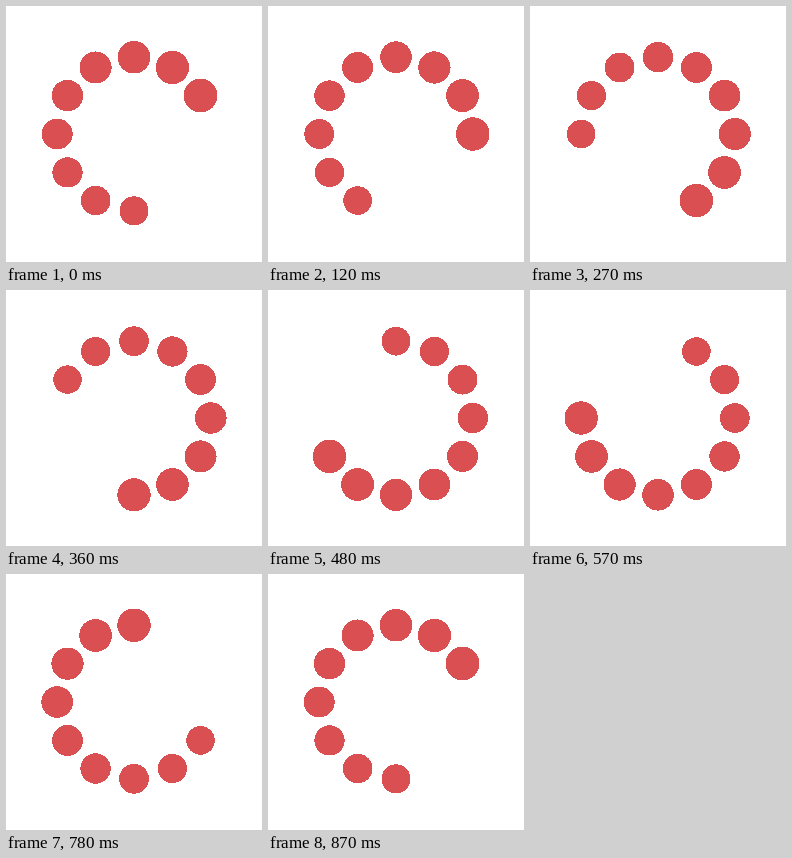
Write an HTML page with a canvas that moves like this. It is 256 px wide and 256 px high and loops after 900 ms.

```html
<!DOCTYPE html>
<html lang="en">
<head>
<meta charset="utf-8">
<title>Spinner</title>
<style>
  html, body { margin: 0; width: 100%; height: 100%; overflow: hidden; background: #fff; }
  canvas { display: block; width: 256px; height: 256px; image-rendering: pixelated; }
</style>
</head>
<body>
<canvas id="stage" width="256" height="256"></canvas>
<script>
const ctx = document.getElementById('stage').getContext('2d');
const DOTS = 12, VISIBLE = 9;
const CENTER = 128, ORBIT = 76.8;
const START_RADIUS = 16.9, END_RADIUS = 13.3;
const STEP_MS = 30, STEPS = 30;

// Hard-edged disc: fill only the pixels whose centre lies inside.
function disc(cx, cy, r) {
  for (let y = Math.floor(cy - r); y <= cy + r; y++) {
    const dy = y + 0.5 - cy;
    if (Math.abs(dy) > r) continue;
    const half = Math.sqrt(r * r - dy * dy);
    const left = Math.ceil(cx - half - 0.5);
    const right = Math.floor(cx + half - 0.5);
    ctx.fillRect(left, y, right - left + 1, 1);
  }
}

function draw(step) {
  ctx.fillStyle = '#fff';
  ctx.fillRect(0, 0, 256, 256);
  ctx.fillStyle = '#da4f52';

  // The last step of the loop lands on the same pose as the first.
  const head = (step % (STEPS - 1)) * DOTS / (STEPS - 1);
  for (let k = 0; k < DOTS; k++) {
    const age = (head - 1 - k + 2 * DOTS) % DOTS;
    if (age >= VISIBLE) continue;
    const radius = START_RADIUS + (END_RADIUS - START_RADIUS) * age / DOTS;
    const angle = k * 2 * Math.PI / DOTS;
    disc(CENTER + ORBIT * Math.cos(angle), CENTER + ORBIT * Math.sin(angle), radius);
  }
}

function tick() {
  draw(Math.floor(performance.now() / STEP_MS) % STEPS);
  requestAnimationFrame(tick);
}
tick();
</script>
</body>
</html>
```
